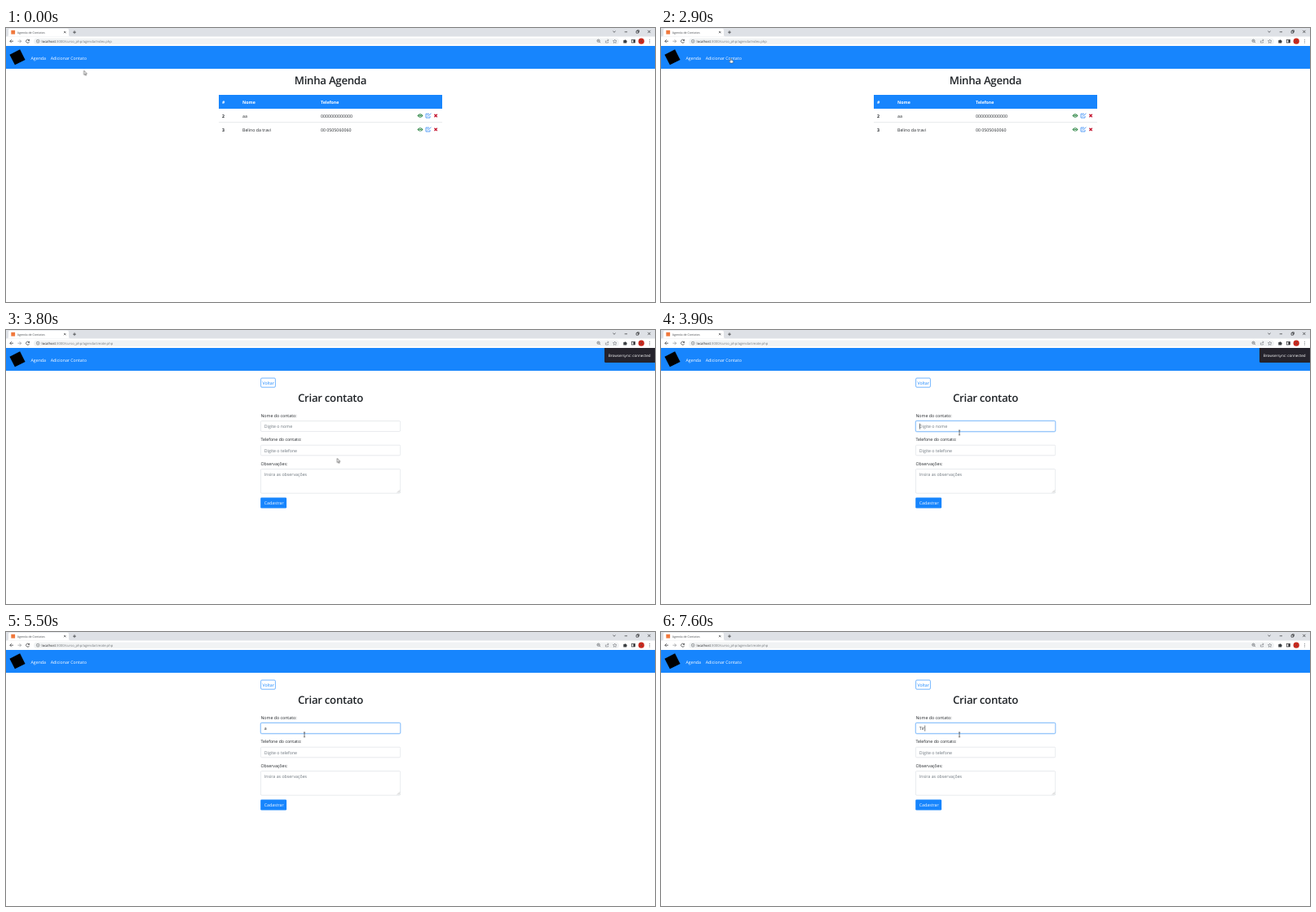
Recreate the animation shown at these times as an HTML page. Size 796 px wide and 336 px high, loop 8 s.

```html
<!DOCTYPE html>
<html lang="pt-BR">
<head>
<meta charset="utf-8">
<title>Agenda de Contatos</title>
<style>
  html, body { margin: 0; width: 100%; height: 100%; overflow: hidden; background: #fff; }
  svg { display: block; width: 796px; height: 336px; }
  text { font: 5.25px "Open Sans", "Noto Sans", sans-serif; fill: #212529; text-rendering: geometricPrecision; }
  .white text, text.white { fill: #fff; }
  .bold { font-weight: 700; }
  text.title { font-size: 13.2px; font-weight: 600; letter-spacing: -.02em; text-anchor: middle; }
  text.tab { font-size: 3.6px; fill: #45494d; }
  text.url { font-size: 4.15px; fill: #74787c; }
  .url .host { fill: #202124; }
  text.toast { font-size: 4.58px; }
  text.hint { fill: #6c757d; }
  .line { fill: none; stroke: #5f6368; stroke-width: .7; }
  .dark { stroke: #303134; }
  .field { fill: #fff; stroke: #ced4da; stroke-width: .5; }
  .blue { fill: #1785fd; }

  .anim, .anim-all > * { animation: 8s step-end infinite; }
  .list { animation-name: list; }
  .form { animation-name: form; }
  .busy { animation-name: busy; }
  .ready { animation-name: ready; }
  .notice { animation-name: notice; }
  .focus { animation-name: focus; }
  .empty { animation-name: empty; }
  .first { animation-name: first; }
  .second { animation-name: second; }
  .caret { animation-name: caret; }
  .pointer { animation-name: move; }
  .arrow { animation-name: arrow; }
  .hand { animation-name: hand; }
  .beam { animation-name: focus; }

  @keyframes list { 0% { opacity: 1 } 37.5%, 100% { opacity: 0 } }
  @keyframes form { 0% { opacity: 0 } 37.5%, 100% { opacity: 1 } }
  @keyframes busy { 0% { opacity: 0 } 37.5% { opacity: 1 } 40%, 100% { opacity: 0 } }
  @keyframes ready { 0% { opacity: 1 } 37.5% { opacity: 0 } 40%, 100% { opacity: 1 } }
  @keyframes notice { 0% { opacity: 0 } 37.5% { opacity: 1 } 67.5%, 100% { opacity: 0 } }
  @keyframes focus { 0% { opacity: 0 } 48.75%, 100% { opacity: 1 } }
  @keyframes empty { 0% { opacity: 1 } 62.5% { opacity: 0 } 91.25% { opacity: 1 } 95%, 100% { opacity: 0 } }
  @keyframes first { 0% { opacity: 0 } 62.5% { opacity: 1 } 91.25%, 100% { opacity: 0 } }
  @keyframes second { 0% { opacity: 0 } 95%, 100% { opacity: 1 } }
  @keyframes caret {
    0% { opacity: 0; transform: translateX(317px) }
    48.75% { opacity: 1; transform: translateX(317px) }
    56.25% { opacity: 0; transform: translateX(317px) }
    62.5% { opacity: 1; transform: translateX(319.6px) }
    68.75% { opacity: 0; transform: translateX(319.6px) }
    82.5% { opacity: 1; transform: translateX(319.6px) }
    88.75% { opacity: 0; transform: translateX(319.6px) }
    95%, 100% { opacity: 1; transform: translateX(323.2px) }
  }
  @keyframes move {
    0% { transform: translate(95.6px, 52.3px) }
    10% { transform: translate(177px, 88px) }
    11.25% { transform: translate(519px, 187.5px) }
    33.75% { transform: translate(98px, 42px) }
    36.25% { transform: translate(85.5px, 37px) }
    40% { transform: translate(168px, 76.3px) }
    42.5% { transform: translate(290px, 120px) }
    43.75% { transform: translate(398.8px, 157.4px) }
    47.5% { transform: translate(406.2px, 157.4px) }
    48.75%, 100% { transform: translate(366px, 125.8px) }
  }
  @keyframes arrow { 0% { opacity: 1 } 33.75% { opacity: 0 } 40% { opacity: 1 } 48.75%, 100% { opacity: 0 } }
  @keyframes hand { 0% { opacity: 0 } 33.75% { opacity: 1 } 40%, 100% { opacity: 0 } }
</style>
</head>
<body>
<svg viewBox="0 0 796 336">
  <defs>
    <g id="actions">
      <path d="M504.5 0Q508-4.4 511.5 0Q508 4.4 504.5 0Z" fill="#23803c"/>
      <circle cx="508" r="1.6" fill="#fff"/>
      <circle cx="508" r=".95" fill="#23803c"/>
      <path d="M519-2.3H515V2.6H520V.4M517.4.8L521.4-2.8" fill="none" stroke="#4a97f7" stroke-width=".9"/>
      <path d="M516.2-.8H518M516.2.6H517.3" stroke="#4a97f7" stroke-width=".5"/>
      <path d="M525.4-1.7L528.8 1.7M528.8-1.7L525.4 1.7" stroke="#c4122f" stroke-width="1.3"/>
    </g>
  </defs>

  <!-- Browser window -->
  <rect width="796" height="10.5" fill="#dee1e6"/>
  <path d="M1 10.5Q3 10.5 3 8.5V2.6Q3 .8 4.8 .8H75.2Q77 .8 77 2.6V8.5Q77 10.5 79 10.5Z" fill="#fff"/>
  <rect class="anim ready" x="6.3" y="2.8" width="4.8" height="4.8" fill="#f0783c"/>
  <circle class="anim busy" cx="8.7" cy="5.2" r="2.1" fill="#f09a70"/>
  <text class="tab" x="13.8" y="6.5">Agenda de Contatos</text>
  <path class="line dark" d="M71.1 4.1L73.3 6.3M73.3 4.1L71.1 6.3M84 3.3V7.1M82.1 5.2H85.9"/>
  <path class="line dark" d="M744.4 3.8L746 5.3L747.6 3.8M758.7 4.8H762M773 3.7H775.5V6.2H773ZM774 3.7V2.8H776.4V5.2H775.5M787.2 2.9L790.4 6.1M790.4 2.9L787.2 6.1"/>
  <rect x="34" y="12.4" width="718" height="7.8" rx="3.9" fill="#f1f3f4"/>
  <path class="line dark" d="M9 16.2H4.8M6.8 14.2L4.8 16.2L6.8 18.2"/>
  <path class="line" stroke-opacity=".7" d="M14.4 16.2H18.6M16.6 14.2L18.6 16.2L16.6 18.2"/>
  <path class="line dark" d="M28.3 15.2A2 2 0 1 0 28.5 16.8M28.6 13.8V15.4H27"/>
  <g class="line">
    <circle cx="39.2" cy="16.2" r="1.9" stroke-width=".55"/>
    <path d="M39.2 15.9V17.3M39.2 14.9V15.4" stroke-width=".6"/>
    <circle cx="726.6" cy="15.7" r="1.6"/>
    <path d="M727.8 16.9L729 18.1M725.8 15.7H727.4"/>
    <path d="M735.4 15.5V18H738.6V16.8M736.3 16.5Q736.6 14.9 739 14.9M737.8 13.7L739.2 14.9L737.8 16.1" stroke-width=".5"/>
    <path d="M746.7 14L747.4 15.5L749 15.7L747.8 16.8L748.1 18.4L746.7 17.6L745.3 18.4L745.6 16.8L744.4 15.7L746 15.5Z" stroke-width=".5"/>
    <rect x="767.3" y="14.4" width="4" height="3.6" class="line dark"/>
  </g>
  <path d="M757.3 15H758.6A.8 .8 0 0 1 760.2 15H761.2V16A.8 .8 0 0 1 761.2 17.5V18.4H757.3Z" fill="#3c4043"/>
  <rect x="769.4" y="14.4" width="2" height="3.6" fill="#303134"/>
  <circle cx="779.2" cy="16.2" r="3.6" fill="#c8291e"/>
  <text class="tab white" x="779.2" y="17.4" text-anchor="middle">a</text>
  <g fill="#5f6368"><circle cx="789.3" cy="14.5" r=".5"/><circle cx="789.3" cy="16.2" r=".5"/><circle cx="789.3" cy="17.9" r=".5"/></g>

  <!-- Site navigation -->
  <rect class="blue" y="22" width="796" height="28"/>
  <rect x="-7.1" y="-7.1" width="14.2" height="14.2" transform="translate(14 35.8) rotate(-27)"/>
  <g class="white">
    <text x="30.5" y="38.5">Agenda</text>
    <text x="54.8" y="38.5">Adicionar Contato</text>
  </g>

  <!-- Contact list -->
  <g class="anim list">
    <text class="url" x="43.6" y="17.8"><tspan class="host">localhost</tspan>:3000/curso_php/agenda/index.php</text>
    <text class="title" x="398" y="69.2">Minha Agenda</text>
    <rect class="blue" x="261" y="82" width="274" height="17"/>
    <g class="white bold">
      <text class="bold" x="265" y="92.8">#</text>
      <text class="bold" x="290" y="92.8">Nome</text>
      <text class="bold" x="386" y="92.8">Telefone</text>
    </g>
    <rect x="261" y="115.6" width="274" height=".5" fill="#ced3d8"/>
    <text class="bold" x="265" y="109.6">2</text>
    <text x="290" y="109.6">aa</text>
    <text x="386" y="109.6">0000000000000</text>
    <use href="#actions" y="107.5"/>
    <text class="bold" x="265" y="126.5">3</text>
    <text x="290" y="126.5">Belino da travi</text>
    <text x="386" y="126.5">00 0505060060</text>
    <use href="#actions" y="124.4"/>
  </g>

  <!-- New contact form -->
  <g class="anim form">
    <text class="url" x="43.6" y="17.8"><tspan class="host">localhost</tspan>:3000/curso_php/agenda/create.php</text>
    <rect x="312.6" y="59" width="17.8" height="11.2" rx="1.3" fill="#fff" stroke="#1785fd" stroke-width=".6"/>
    <text class="blue" style="fill:#1785fd" x="314.4" y="66.9">Voltar</text>
    <text class="title" x="398" y="87.7">Criar contato</text>

    <text x="312.4" y="107">Nome do contato:</text>
    <rect class="field" x="312.4" y="111.6" width="171.3" height="12.8" rx="1.3"/>
    <rect class="anim focus" x="312.2" y="111.3" width="171.7" height="13.4" rx="1.6" fill="none" stroke="#bfdeff" stroke-width="1.5"/>
    <rect class="anim focus" x="312.4" y="111.6" width="171.3" height="12.8" rx="1.3" fill="#fff" stroke="#5aa5f5" stroke-width=".6"/>
    <text class="hint anim empty" x="316.8" y="120.2">Digite o nome</text>
    <text class="anim first" x="316.8" y="120.2">a</text>
    <text class="anim second" x="316.8" y="120.2">Tir</text>
    <rect class="anim caret" y="114.6" width=".6" height="7" fill="#212529"/>

    <text x="312.4" y="136.4">Telefone do contato:</text>
    <rect class="field" x="312.4" y="141.2" width="171.3" height="12.6" rx="1.3"/>
    <text class="hint" x="316.8" y="149.8">Digite o telefone</text>

    <text x="312.4" y="165.9">Observações:</text>
    <rect class="field" x="312.4" y="170.6" width="171.3" height="29.6" rx="1.3"/>
    <text class="hint" x="316.8" y="179.2">Insira as observações</text>
    <path d="M480 199.4L483 196.4M481.8 199.4L483 198.2" stroke="#777" stroke-width=".4"/>

    <rect class="blue" x="312.2" y="205.4" width="31.9" height="13.2" rx="1.3"/>
    <text class="white" x="316.8" y="214.1">Cadastrar</text>
  </g>

  <g class="anim notice">
    <path d="M734 22H796V40H735.6Q734 40 734 38.4Z" fill="#25232c"/>
    <text class="toast white" x="738.8" y="32.8">Browsersync: connected</text>
  </g>

  <g class="anim pointer">
    <path class="anim arrow" d="M0 0V5.2L1.2 4.1L2 6L2.8 5.6L2 3.8H3.7Z" fill="#fff" stroke="#222" stroke-width=".5"/>
    <path class="anim hand" d="M-.5 .5Q0-.2 .5 .5V2.3L2.6 2.9Q3.2 3.1 3 4L2.6 6H-.2L-1.9 3.7Q-1.5 3-.5 3.8Z" fill="#fff" stroke="#222" stroke-width=".4"/>
    <path class="anim beam" d="M-1.1-2.8H1.1M0-2.8V2.8M-1.1 2.8H1.1" fill="none" stroke="#222" stroke-width=".6"/>
  </g>
</svg>
</body>
</html>
```
